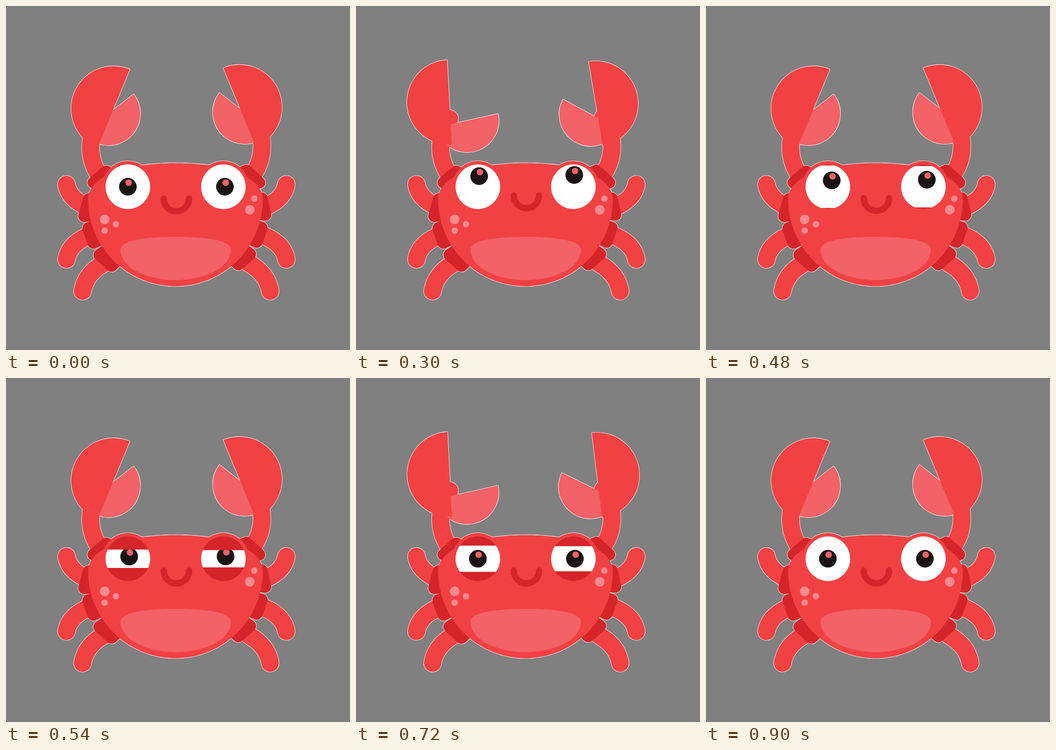
These frames come from a looping animation (748 px wide and 748 px high, 1350 ms). An HTML page with a canvas:

```html
<!DOCTYPE html>
<html lang="en">
<head>
<meta charset="utf-8">
<title>Crab</title>
<style>
  html, body { margin: 0; width: 100%; height: 100%; overflow: hidden; background: #808080; }
  canvas { display: block; width: 748px; height: 748px; }
</style>
</head>
<body>
<canvas id="stage" width="748" height="748"></canvas>
<script>
const ctx = document.getElementById('stage').getContext('2d');
const LOOP = 1350, STEP = 30, FRINGE = 1.7;
const RED = '#f24143', DARK = '#d4252a', PINK = '#f26267',
      SPOT = '#f88a90', BLACK = '#1a1514', WHITE = '#fff';
const RAD = Math.PI / 180;

const arm = new Path2D('M203.5 245A108 108 0 0 0 201 365');
const legs = new Path2D(
  'M131.5 388Q137 419 175 436M131.5 551Q137 519 176 501M166.5 620Q173 582 212 560');
// Rounded wedges that point at the middle of the body.
const joints = new Path2D([
  '218 360L190 384', '180 420L170 457', '179 483L190 515', '203 541L230 565',
  '522 358L551 384', '556 418L564 454', '556 482L545 513', '531 539L505 562'
].map(edge => `M${edge}L368 430Z`).join(''));
const body = new Path2D(
  'M178.5 420C178.5 375 250 341.4 369 341.4C488 341.4 558.5 375 558.5 420' +
  'A190 189.5 0 0 1 178.5 420Z');
const belly = new Path2D(
  'M249 530C249 508 310 502 369 502S489 508 489 530C489 570 430 596 369 596S249 570 249 530Z');
const smile = new Path2D('M343 412A27.5 27.5 0 0 0 398 412');

const clamp = x => Math.min(1, Math.max(0, x));
const ramp = (t, a, b) => clamp((t - a) / (b - a));
const ease = (t, a, b) => (1 - Math.cos(Math.PI * ramp(t, a, b))) / 2;
const pulse = (t, peak) => 1 - ease(Math.abs(t - peak), 0, 116);

function disc(x, y, r, color) {
  ctx.fillStyle = color;
  ctx.beginPath();
  ctx.arc(x, y, r, 0, 2 * Math.PI);
  ctx.fill();
}

// With rim set, a shape is drawn slightly larger in white.
function line(path, width, color, rim) {
  ctx.lineWidth = width + (rim ? FRINGE : 0);
  ctx.strokeStyle = rim ? WHITE : color;
  ctx.stroke(path);
}

function area(path, color, rim) {
  ctx.fillStyle = rim ? WHITE : color;
  ctx.fill(path);
  if (rim) line(path, 0, WHITE, true);
}

function halfDisc(x, y, r, start, px, py, turn, color, rim) {
  const path = new Path2D();
  path.arc(x, y, r, start * RAD, (start + 180) * RAD);
  path.closePath();
  ctx.save();
  ctx.translate(px, py);
  ctx.rotate(turn * RAD);
  ctx.translate(-px, -py);
  area(path, color, rim);
  ctx.restore();
}

function claw(upper, lower, px, py, rim) {
  halfDisc(223, 234, 69, -37.9, 199, 282.5, lower, PINK, rim);
  halfDisc(234, 223, 92.3, 112.4, px, py, -upper, RED, rim);
}

function mirrored(dx, dy, draw) {
  ctx.save();
  ctx.translate(dx, dy);
  ctx.scale(-1, 1);
  draw();
  ctx.restore();
}

function crab(left, right, rim) {
  line(legs, 38, RED, rim);
  line(arm, 38, RED, rim);
  mirrored(741, 0, () => line(legs, 38, RED, rim));
  mirrored(740.5, -2, () => line(arm, 38, RED, rim));
  claw(left, left, 188.4, 284, rim);
  mirrored(741.7, -3, () => claw(right, right * 0.735, 192.4, 278, rim));
  area(joints, DARK, rim);
  line(joints, 26, DARK, rim);
  area(body, RED, rim);
  for (const x of [265, 472.5]) disc(x, 393, 56 + (rim ? FRINGE / 2 : 0), rim ? WHITE : RED);
}

function eye(x, px, py, gap) {
  const y = 393, r = 48.5;
  ctx.save();
  if (gap < 48) {
    disc(x, y, r, DARK);
    ctx.beginPath();
    ctx.rect(x - 60, y - Math.max(0, gap), 120, 2 * Math.max(0, gap));
    ctx.clip();
  }
  disc(x, y, r, WHITE);
  disc(px, py, 19.2, BLACK);
  disc(px + 1.7, py - 8.8, 7, PINK);
  ctx.restore();
}

function eyes(t) {
  const up = ramp(t, 0, 150) - ramp(t, 420, 570);
  const across = ramp(t, 210, 360);
  const open = 1 - ease(t, 458, 605) + ease(t, 605, 813);
  const gap = 49 * open;
  eye(265, 265 + up * (-14 + 28 * across), 393 - 23 * up, gap);
  eye(472.7, 476 + up * (-14 + 21 * across), 393 - 25.5 * up, open < 1 ? gap - 1.3 : gap);
}

function mouth(t) {
  ctx.save();
  ctx.translate(0, 7 * (1 - ease(t, 0, 180) + ease(t, 300, 540)));
  line(smile, 14, DARK);
  ctx.restore();
}

function draw(t) {
  ctx.fillStyle = '#808080';
  ctx.fillRect(0, 0, 748, 748);
  ctx.lineCap = ctx.lineJoin = 'round';
  const left = 25.7 * (pulse(t, 295) + pulse(t, 710));
  const right = 31 * (pulse(t, 364) + pulse(t, 778));
  crab(left, right, true);
  crab(left, right, false);
  area(belly, PINK);
  for (const [x, y, r] of [[214.5, 464, 10.5], [239, 474.5, 7], [214.5, 488.5, 7],
                           [540, 419, 7], [530, 443, 10.5]]) disc(x, y, r, SPOT);
  mouth(t);
  eyes(t);
}

const begin = performance.now();
function tick() {
  const t = (performance.now() - begin) % LOOP;
  draw(Math.floor(t / STEP) * STEP);
  requestAnimationFrame(tick);
}
tick();
</script>
</body>
</html>
```
